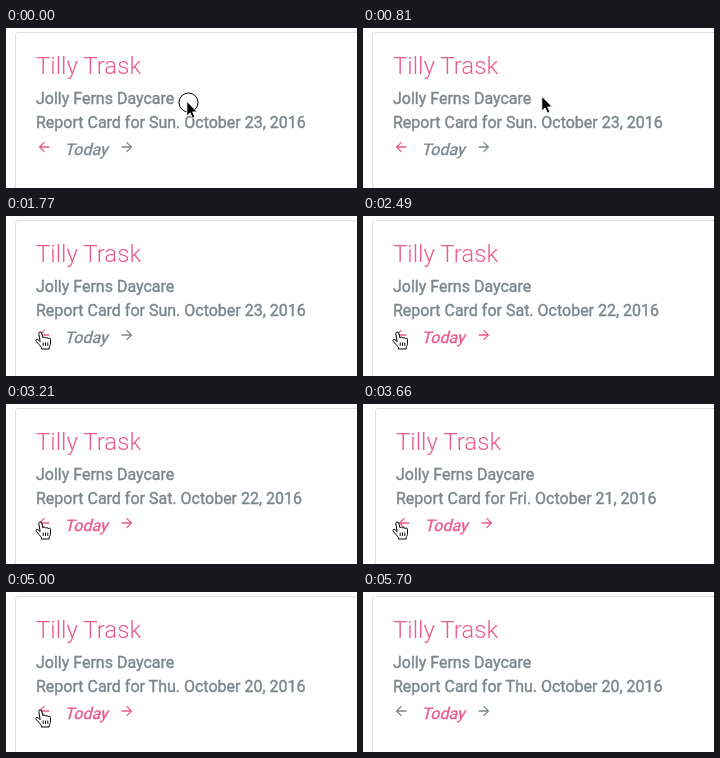
Recreate the animation shown at these times as an HTML page. Size 351x160 px, loop 6.07 s.

```html
<!DOCTYPE html>
<html lang="en">
<head>
<meta charset="utf-8">
<title>Report card</title>
<style>
  html, body { margin: 0; width: 100%; height: 100%; overflow: hidden; background: #fff; }
  svg { display: block; width: 351px; height: 160px; }
  #page { color: #7c868b; }
  .on, .name { color: #ea5c89; }
  text { font: 400 16px Roboto, sans-serif; fill: currentColor; stroke: currentColor; stroke-width: .4px; }
  .name { font-size: 24px; font-weight: 300; stroke: none; }
  .icon { fill: currentColor; }
</style>
</head>
<body>
<svg viewBox="0 0 351 160">
  <g id="page">
    <rect x="9.5" y="4.5" width="400" height="200" rx="3" fill="#fefefe" stroke="#dedede"/>
    <text class="name" x="30" y="46">Tilly Trask</text>
    <text x="30" y="76">Jolly Ferns Daycare</text>
    <text id="report" x="30" y="100"></text>
    <path id="back" class="icon" transform="translate(30 111) scale(.667)"
      d="M20 11H7.83l5.59-5.59L12 4l-8 8 8 8 1.41-1.41L7.83 13H20z"/>
    <text id="today" transform="translate(58.5 127) skewX(-14)">Today</text>
    <path id="next" class="icon" transform="translate(113 111) scale(.667)"
      d="M12 4l-1.41 1.41L16.17 11H4v2h12.17l-5.58 5.59L12 20l8-8z"/>
  </g>
  <g id="pointer">
    <circle id="ring" r="9.5" fill="none" stroke="#000"/>
    <path id="arrow" transform="translate(.8 .3) scale(.95)" fill="#000" stroke="#fff"
      d="M0 0v15.5l3.5-3.3 2.4 5.6 2.7-1.1-2.4-5.5h4.9z"/>
    <g id="hand" transform="translate(-6.8 -.3)" stroke="#000" stroke-linejoin="round">
      <path fill="#fff" d="M5 11L3.6 3a1.5 1.5 0 0 1 2.9-.7L7.8 7.2a1.5 1.3 0 0 1 2.8.3
        a1.4 1.3 0 0 1 2.5.6a1.2 1.2 0 0 1 2.2 1V12.5c0 2-1 3-1.3 4V18.3H6.2V16.7
        C5 15 3 13 1 10.6c-.9-1.5.7-2.6 2-1.5z"/>
      <path d="M8 11.8v3.4M10.3 11.8v3.4M12.6 11.8v3.4"/>
    </g>
  </g>
</svg>
<script>
const LOOP = 6070;
const $ = id => document.getElementById(id);

// Spread pointer positions evenly between two times.
const move = (from, to, shape, points) => points.map(([x, y], i) =>
  [Math.round((from + (to - from) * i / (points.length - 1)) / 10) * 10, { x, y, shape }]);
const click = (down, up) => [[down, { ring: true }], [up, { ring: false }]];

const steps = [
  [0, { x: 180, y: 73, shape: 'arrow', ring: true, date: 'Sun. October 23',
        shift: 0, back: true, today: false, next: false }],
  [90, { ring: false }],
  ...move(810, 1330, 'arrow',
    [[178, 68], [166, 70], [141, 78], [106, 90], [76, 99], [59, 103], [55, 104]]),
  [1420, { x: 49, y: 101 }],
  ...move(1510, 1590, 'hand', [[40, 113], [36, 115]]),
  ...click(1680, 1770),
  [2490, { date: 'Sat. October 22', today: true, next: true }],
  [2760, { y: 116 }],
  [2940, { y: 117 }],
  ...click(3120, 3210),
  [3660, { date: 'Fri. October 21', shift: 3 }],
  ...click(4370, 4460),
  [5000, { date: 'Thu. October 20', shift: 0 }],
  [5270, { x: 43, y: 118 }],
  [5360, { back: false, next: false }],
  ...move(5360, 5700, 'arrow', [[75, 121], [135, 129], [197, 139], [243, 152], [265, 185]])
];

const stateAt = t => Object.assign({}, ...steps.filter(s => s[0] <= t).map(s => s[1]));
const show = (id, on) => $(id).setAttribute('visibility', on ? 'visible' : 'hidden');

function draw(t) {
  const s = stateAt(t);
  $('page').setAttribute('transform', `translate(${s.shift} 0)`);
  $('report').textContent = `Report Card for ${s.date}, 2016`;
  for (const id of ['back', 'today', 'next']) $(id).classList.toggle('on', s[id]);
  $('pointer').setAttribute('transform', `translate(${s.x} ${s.y})`);
  const arrow = s.shape === 'arrow';
  show('arrow', arrow);
  show('hand', !arrow);
  show('ring', s.ring);
  $('ring').setAttribute('transform', arrow ? 'translate(2.5 1.5)' : 'translate(.5 .5)');
}

const start = performance.now();
function frame(now) {
  draw(Math.max(0, now - start) % LOOP);
  requestAnimationFrame(frame);
}
draw(0);
requestAnimationFrame(frame);
</script>
</body>
</html>
```
